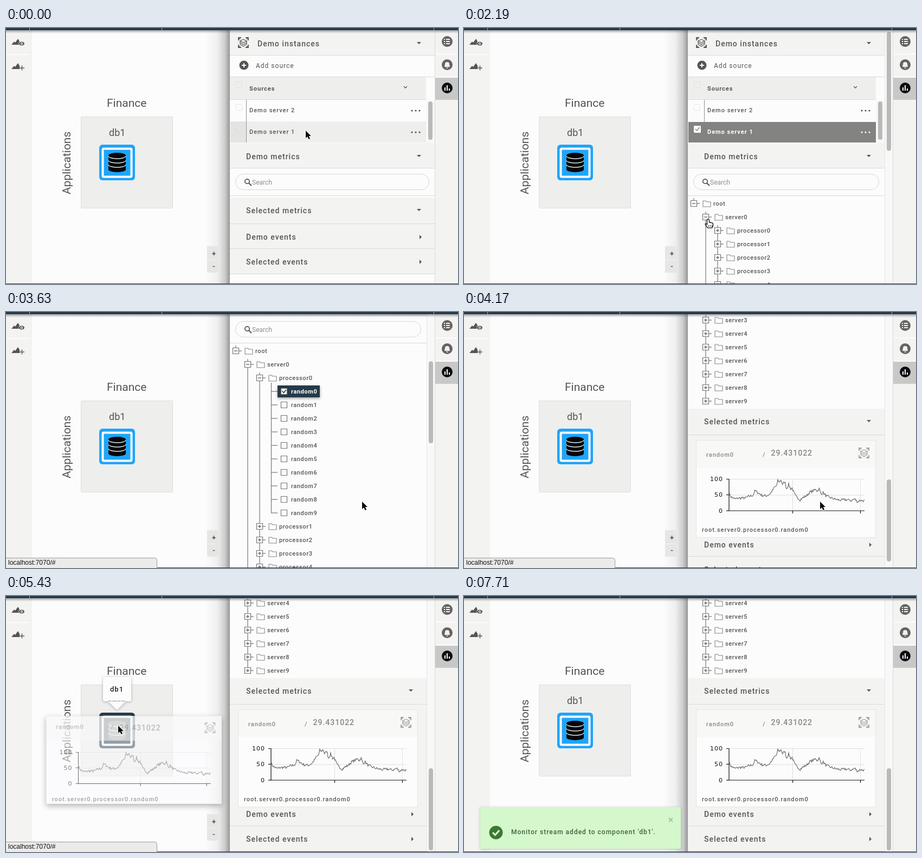
These frames come from a looping animation (834x474 px, 7.74 s). An HTML page with a canvas:

```html
<!DOCTYPE html>
<html>
<head>
<meta charset="utf-8">
<style>
html, body { margin: 0; width: 100%; height: 100%; overflow: hidden; background: #fcfcfe; }
canvas { display: block; }
</style>
</head>
<body>
<canvas id="stage" width="834" height="474"></canvas>
<script>
const c = document.getElementById('stage').getContext('2d');
const LOOP = 7740, TOP = 5, VIEW = 468, ROW = 25;
const WHITE = '#fcfcfd', TINT = '#f3f3f2', DEEP = '#eeeeed', LINE = '#dadad8';
const INK = '#555553', MUTED = '#8f8f8d', DARK = '#243a48', BLUE = '#1ea5fa';
const SANS = 'Roboto, Arial, sans-serif';

const T = { check: 600, root: 1770, server: 2100, proc: 2430, pick: 3000, hover: 4620, drag: 4950, over: 5280, drop: 5820, toast: 6150 };

// time, x, y, hand
const PATH = [
  [0, 553, 190, 0], [990, 553, 190, 0], [1440, 450, 244, 1],
  [1710, 424, 322, 1], [1800, 424, 322, 1], [2040, 446, 349, 1], [2130, 446, 349, 1], [2340, 468, 374, 1],
  [2490, 468, 374, 1], [2850, 515, 408, 1], [2940, 516, 402, 1], [3030, 516, 402, 1], [3300, 657, 351, 0],
  [4290, 657, 351, 0], [4740, 566, 231, 1], [4950, 566, 231, 0], [5400, 207, 240, 0], [5880, 207, 240, 0],
  [6480, 300, 500, 0]
];
const SCROLL = { from: 3300, time: 970, end: 937 };
const CURVE = [
  0,54, 4,43, 11,37, 19,40, 30,40, 36,45, 44,48, 48,63, 53,57, 61,48, 69,47, 75,52, 80,63, 84,74, 88,79,
  90,94, 93,90, 96,97, 99,82, 103,92, 106,69, 110,82, 114,68, 116,72, 122,48, 128,39, 131,34, 137,42,
  143,47, 149,58, 156,63, 160,68, 163,61, 166,70, 170,52, 173,58, 179,47, 185,42, 196,36, 206,33,
  215,35, 225,32, 232,37, 237,28, 242,33, 250,31
];

const clamp = v => Math.max(0, Math.min(1, v));
const smooth = v => v * v * (3 - 2 * v);

// Monotone cubic through the keys: rests stay still, passing points keep their speed
function track(keys, t) {
  const last = keys.length - 1;
  if (t >= keys[last][0]) return keys[last].slice(1);
  let i = 0;
  while (t >= keys[i + 1][0]) i++;
  const span = keys[i + 1][0] - keys[i][0], u = (t - keys[i][0]) / span;
  const slope = (n, j) => n < 0 || n >= last ? 0 : (keys[n + 1][j] - keys[n][j]) / (keys[n + 1][0] - keys[n][0]);
  const tangent = (n, j) => {
    const a = slope(n - 1, j), b = slope(n, j);
    return a * b > 0 ? 2 * a * b / (a + b) : 0;
  };
  return [1, 2, 3].map(j => {
    const a = keys[i][j], b = keys[i + 1][j];
    return a + (b - a) * smooth(u)
      + span * (tangent(i, j) * u * (1 - u) ** 2 - tangent(i + 1, j) * u * u * (1 - u));
  });
}

function rect(x, y, w, h, fill) { c.fillStyle = fill; c.fillRect(x, y, w, h); }

function round(x, y, w, h, r, fill, stroke, lw = 1) {
  c.beginPath();
  c.roundRect(x, y, w, h, r);
  if (fill) { c.fillStyle = fill; c.fill(); }
  if (stroke) { c.strokeStyle = stroke; c.lineWidth = lw; c.stroke(); }
}

function disc(x, y, r, fill) {
  c.beginPath(); c.arc(x, y, r, 0, 7); c.fillStyle = fill; c.fill();
}

function line(pts, color, lw = 1) {
  c.beginPath();
  for (let i = 0; i < pts.length; i += 2) c.lineTo(pts[i], pts[i + 1]);
  c.strokeStyle = color; c.lineWidth = lw; c.stroke();
}

function poly(pts, fill) {
  c.beginPath();
  for (let i = 0; i < pts.length; i += 2) c.lineTo(pts[i], pts[i + 1]);
  c.closePath(); c.fillStyle = fill; c.fill();
}

function text(s, x, y, size, color = INK, weight = 500, gap = 1, family = SANS, align = 'left') {
  c.font = `${weight} ${size}px ${family}`;
  c.letterSpacing = gap + 'px';
  c.textAlign = align;
  c.textBaseline = 'alphabetic';
  c.fillStyle = color;
  c.fillText(s, x, y + size * 0.36);
}

function shadow(color, blur, dy) { c.shadowColor = color; c.shadowBlur = blur; c.shadowOffsetY = dy; }

// Shadow around a box, leaving its inside clear
function halo(x, y, w, h, alpha) {
  c.save();
  c.beginPath();
  c.rect(x - 40, y - 40, w + 80, h + 80);
  c.rect(x, y, w, h);
  c.clip('evenodd');
  shadow(`rgba(60,60,60,${alpha})`, 10, 4);
  rect(x, y, w, h, '#fff');
  c.restore();
}

function caret(x, y, open) {
  poly(open ? [x - 4, y - 2, x + 4, y - 2, x, y + 2] : [x - 2, y - 4, x + 2, y, x - 2, y + 4], INK);
}

function layers(x, y, color) {
  for (const [sx, sy] of [[-1, -1], [1, -1], [1, 1], [-1, 1]]) {
    line([x + sx * 9, y + sy * 4, x + sx * 9, y + sy * 9, x + sx * 4, y + sy * 9], color, 1.8);
    line([x + sx * 6, y + sy * 6, x + sx * 9, y + sy * 9], color, 1.2);
  }
  line([x, y - 6, x + 6, y - 3, x, y, x - 6, y - 3, x, y - 6], color, 1.2);
  line([x - 6, y - 3, x - 6, y + 3, x, y + 7, x + 6, y + 3, x + 6, y - 3], color, 1.2);
  line([x - 6, y, x, y + 3.5, x + 6, y], color, 1.2);
}

function mountains(x, y) {
  poly([x - 12, y + 5, x - 7, y - 1, x - 5, y + 1, x, y - 6, x + 7, y + 5], INK);
}

function leftBar() {
  rect(0, 4, 48, 470, TINT);
  rect(0, 48, 44, 2, WHITE);
  mountains(22, 26);
  disc(29, 29, 5.5, TINT);
  c.beginPath(); c.ellipse(29, 29, 5, 3.5, 0, 0, 7); c.fillStyle = INK; c.fill();
  disc(29, 29, 2.2, TINT); disc(29, 29, 1.1, INK);
  mountains(22, 71);
  rect(25, 69, 9, 9, TINT);
  line([25, 74, 34, 74], INK, 1.4); line([29.5, 69.5, 29.5, 78.5], INK, 1.4);
}

function rightBar() {
  rect(791, 4, 43, 470, TINT);
  rect(791, 4, 1, 470, LINE);
  rect(792, 92, 42, 41, '#c8c8c7');
  rect(793, 47, 41, 2, WHITE);
  rect(793, 90, 41, 2, WHITE);
  disc(814, 25, 10, '#646462');
  for (const y of [21, 25, 29]) { rect(808, y - 1, 2, 2, TINT); rect(812, y - 1, 7, 2, TINT); }
  disc(814, 68, 10, '#646462');
  c.beginPath(); c.arc(814, 67, 4, Math.PI, 0); c.lineTo(819, 72); c.lineTo(809, 72);
  c.fillStyle = TINT; c.fill();
  rect(812.5, 73, 3, 1.5, TINT);
  disc(814, 111, 10, '#0b0d10');
  rect(809, 110, 2, 6, WHITE); rect(813, 106, 2, 10, WHITE); rect(817, 112, 2, 4, WHITE);
}

function database(over) {
  const box = over ? DARK : BLUE;
  round(172, 216, 66, 66, 6, box);
  round(178.5, 223.5, 53, 52, 2, box, '#fff', 4);
  c.beginPath();
  c.ellipse(205, 236, 16, 5, 0, Math.PI, 0);
  c.lineTo(221, 262);
  c.ellipse(205, 262, 16, 5, 0, 0, Math.PI);
  c.closePath(); c.fillStyle = over ? '#70706c' : '#050607'; c.fill();
  for (const y of [237, 245, 253]) {
    c.beginPath(); c.ellipse(205, y, 16, 5, 0, 0.05, Math.PI - 0.05);
    c.strokeStyle = '#dfe8ec'; c.lineWidth = 1.4; c.stroke();
  }
}

function canvasArea(over) {
  rect(48, 4, 365, 470, WHITE);
  text('Finance', 186, 138, 21, INK, 400, 0);
  c.save();
  c.translate(111, 308); c.rotate(-Math.PI / 2);
  text('Applications', 0, 0, 21, INK, 400, 0);
  c.restore();
  round(138.5, 164.5, 169, 169, 1, DEEP, '#dededc');
  text('db1', 190, 193.5, 18, INK, 400, 0);
  database(over);
  const g = c.createLinearGradient(368, 0, 413, 0);
  g.addColorStop(0, 'rgba(120,120,120,0)');
  g.addColorStop(0.5, 'rgba(120,120,120,.1)');
  g.addColorStop(0.8, 'rgba(120,120,120,.36)');
  g.addColorStop(1, 'rgba(110,110,110,.72)');
  rect(368, 4, 45, 470, g);
  rect(371, 404, 25, 25, '#e6e6e5'); rect(371, 430, 25, 23, '#e6e6e5');
  text('+', 383.5, 417, 13, INK, 700, 0, SANS, 'center');
  text('-', 383.5, 441, 13, INK, 700, 0, SANS, 'center');
}

function header(top, bottom, label, cy, open, R, x = 443) {
  rect(413, top, R - 413, bottom - top, TINT);
  rect(413, bottom, R - 413, 1, LINE);
  text(label, x, cy, 14);
  caret(open ? R - 29 : R - 26, open ? cy - 1 : cy, open);
}

function dots(x, y, color) { for (const d of [-7, 0, 7]) disc(x + d, y, 1.6, color); }

function sources(R, checked) {
  const E = R - 16;
  rect(413, 91, E - 413, 42, DEEP);
  rect(413, 90, R - 413, 1, LINE);
  rect(413, 132, E - 413, 1, LINE);
  text('Sources', 449, 112, 11, INK, 600);
  line([E - 41, 108, E - 38, 111, E - 35, 108], INK, 1.3);
  round(424.5, 99.5, 11, 11, 1, null, '#e2e2e0');
  round(424.5, 141.5, 11, 11, 1, WHITE, '#e6e6e4');
  text('Demo server 2', 449, 152, 11);
  dots(E - 19, 153, INK);
  if (checked) {
    rect(414, 174, E - 414, 38, '#838381');
    round(424, 181, 13, 13, 1.5, WHITE);
    line([427, 187, 430, 190, 434.5, 184], '#838381', 1.4);
  } else {
    rect(414, 173, E - 414, 39, DEEP);
    rect(414, 173, 29, 39, '#e4e4e2');
    round(424.5, 181.5, 11, 11, 1, null, LINE);
  }
  text('Demo server 1', 449, 192, 11, checked ? '#fff' : INK, checked ? 700 : 500);
  dots(E - 19, 193, checked ? '#fff' : INK);
  rect(443, 133, 1, checked ? 41 : 79, '#929290');
  rect(E, 133, 16, 80, '#f8f8f8');
  round(E + 4, 136, 8, 71, 4, '#b9b9b8');
}

function search(R) {
  rect(413, 260, R - 413, 51, WHITE);
  rect(413, 310, R - 413, 1, LINE);
  round(423.5, 270.5, R - 434, 29, 14.5, WHITE, '#d6d6d4');
  c.beginPath(); c.arc(445, 284, 4.2, 0, 7); c.strokeStyle = INK; c.lineWidth = 1.8; c.stroke();
  line([448, 287, 453, 292], INK, 2.2);
  text('Search', 454, 285.5, 12, MUTED, 400, 0);
}

// Visible rows of the tree: depth, label, state
function treeRows(t) {
  const rows = [];
  if (t < T.check) return rows;
  rows.push([0, 'root', t >= T.root]);
  if (t < T.root) return rows;
  for (let s = 0; s < 10; s++) {
    const sOpen = !s && t >= T.server;
    rows.push([1, 'server' + s, sOpen]);
    for (let p = 0; sOpen && p < 10; p++) {
      const pOpen = !p && t >= T.proc;
      rows.push([2, 'processor' + p, pOpen]);
      for (let r = 0; pOpen && r < 10; r++) rows.push([3, 'random' + r, !r && t >= T.pick]);
    }
  }
  return rows;
}

function tree(rows, R) {
  const wire = '#747472';
  rect(413, 311, R - 413, rows.length * ROW + 2, WHITE);
  for (let d = 0; d < 4; d++) {
    const ys = rows.map((r, i) => r[0] === d ? 325 + i * ROW : 0).filter(Boolean);
    if (ys.length) {
      const x = d < 3 ? 424 + d * 22 : 489.5;
      line([x, ys[0] - (d < 3 ? 10 : 16), x, ys[ys.length - 1]], wire, 1.2);
    }
  }
  rows.forEach(([d, label, on], i) => {
    const y = 325 + i * ROW, x = 424 + d * 22;
    if (d < 3) {
      line([x, y, x + 11, y], wire, 1.2);
      round(x - 5.5, y - 5.5, 11, 11, 0, WHITE, wire, 1.2);
      line([x - 3, y, x + 3, y], INK, 1.2);
      if (!on) line([x, y - 3, x, y + 3], INK, 1.2);
      line([x + 17, y - 5, x + 22, y - 5, x + 24, y - 3, x + 31, y - 3, x + 31, y + 6, x + 17, y + 6, x + 17, y - 5.5], '#868684', 1.1);
      text(label, x + 36, y, 11, INK, 500, 0.6);
      return;
    }
    line([489, y, 501, y], wire, 1.2);
    if (on) {
      c.save();
      shadow('rgba(90,90,90,.6)', 5, 2);
      rect(501, y - 11, 78, 22, DARK);
      c.restore();
    }
    round(507.5, y - 5.5, 11, 11, 0, WHITE, '#777775', 1.2);
    if (on) line([509.5, y - 1, 512.5, y + 2.5, 517, y - 3], DARK, 1.6);
    text(label, 526, y, 11, on ? '#fff' : INK, on ? 700 : 500, 0.6);
  });
}

function plot(x, y, w, h) {
  for (const k of [0, 0.5]) line([x, y + h * k + 0.5, x + w, y + h * k + 0.5], '#dededc');
  line([x + w * 0.47, y, x + w * 0.47, y + h], '#dededc');
  line([x + w * 0.97, y, x + w * 0.97, y + h], '#e4e4e2');
  line([x - 5, y + 0.5, x, y + 0.5, x, y + h, x + w, y + h], '#111', 1.2);
  line([x - 5, y + h, x, y + h], '#111', 1.2);
  line([x - 5, y + h / 2, x, y + h / 2], '#111', 1.2);
  for (const k of [0.47, 0.97]) line([x + w * k, y + h, x + w * k, y + h + 5], '#111', 1.2);
  ['100', '50', '0'].forEach((s, i) =>
    text(s, x - 11, y + h * i / 2, 11, '#111', 400, 1, '"DejaVu Sans", sans-serif', 'right'));
  const pts = [];
  let j = 0, seed = 7;
  for (let px = 0; px <= 250; px += 1.25) {
    while (CURVE[j + 2] < px) j += 2;
    const k = (px - CURVE[j]) / (CURVE[j + 2] - CURVE[j]);
    seed = seed * 16807 % 2147483647;
    const v = CURVE[j + 1] + (CURVE[j + 3] - CURVE[j + 1]) * k + (seed / 2147483647 - 0.5) * 8;
    pts.push(x + px * w / 250, y + h * (1 - v / 100));
  }
  line(pts, '#62625f', 1.1);
}

// m: width, height, header height, then y of name, value, plot, path
function card(x, y, m, ink, mark) {
  const [w, h, hd, name, value, top, path] = m, k = w / 332;
  rect(x, y, w, h, WHITE);
  rect(x, y, w, hd, '#f8f8f7');
  c.strokeStyle = '#e6e6e4'; c.lineWidth = 1;
  c.strokeRect(x + 0.5, y + 0.5, w - 1, h - 1);
  text('random0', x + 19 * k, y + name, 11, ink);
  text('/', x + 123 * k, y + name, 11, ink);
  text('29.431022', x + 138.5 * k, y + value, 14, ink);
  layers(x + 310 * k, y + value, mark);
  plot(x + 61 * k, y + top, 250 * k, 59 * (0.5 + k / 2));
  text('root.server0.processor0.random0', x + 11 * k, y + path, 11);
}

function panel(t) {
  const checked = t >= T.check, R = checked ? 776 : 791;
  const rows = treeRows(t), picked = t >= T.pick;
  const selY = 338 + rows.length * ROW, evY = selY + (picked ? 228 : 49);
  const height = evY + 69 - TOP;
  const off = SCROLL.end * smooth(clamp((t - SCROLL.from) / SCROLL.time));

  c.save();
  c.beginPath(); c.rect(413, TOP, 378, VIEW); c.clip();
  rect(413, TOP, 378, VIEW, WHITE);
  c.save();
  c.translate(0, -Math.round(off));
  header(TOP, 50, 'Demo instances', 29, true, R, 464);
  layers(438, 27, INK);
  disc(439, 69, 8.5, INK);
  line([435, 69, 443, 69], WHITE, 2); line([439, 65, 439, 73], WHITE, 2);
  text('Add source', 461, 70, 12, INK, 400);
  sources(R, checked);
  header(213, 259, 'Demo metrics', 238, true, R);
  search(R);
  tree(rows, R);
  header(selY - 24, selY + 24, 'Selected metrics', selY, true, R);
  if (picked) rect(413, selY + 25, R - 413, 190, TINT);
  header(evY - 24, evY + 21, 'Demo events', evY, false, R);
  header(evY + 22, evY + 68, 'Selected events', evY + 46, false, R);
  if (picked) {
    const lift = t < T.drag ? smooth(clamp((t - T.hover) / 180)) : 0;
    rect(413, selY + 24, R - 413, 1, LINE);
    c.save();
    c.translate(594, selY + 124.5);
    c.scale(1 + 0.05 * lift, 1 + 0.05 * lift);
    if (lift) halo(-166, -90.5, 332, 181, 0.55 * lift);
    const near = lift > 0.5;
    card(-166, -90.5, [332, 181, 51, 27, 24, 72, 166], near ? INK : '#868684', near ? INK : '#a2a2a0');
    c.restore();
  }
  c.restore();
  if (height > VIEW) {
    rect(776, TOP, 15, VIEW, '#f8f8f8');
    rect(776, TOP, 1, VIEW, '#e6e6e5');
    const k = VIEW / height;
    round(780, TOP + off * k + 2, 8, VIEW * k - 4, 4, '#b9b9b8');
  }
  c.restore();
}

function tooltip() {
  c.save();
  shadow('rgba(100,100,100,.5)', 5, 1);
  c.beginPath();
  c.roundRect(179, 150, 52, 45, 3);
  c.moveTo(187, 194); c.lineTo(205, 211); c.lineTo(222, 194);
  c.fillStyle = WHITE; c.fill();
  c.restore();
  text('db1', 192, 172, 13, '#222220');
}

function toast(t) {
  const k = smooth(clamp((t - T.toast) / 240));
  if (!k) return;
  c.save();
  c.globalAlpha = k;
  c.save();
  shadow('rgba(110,130,110,.5)', 5, 1);
  round(30, 391, 370, 77, 2, '#d4f8cc');
  c.restore();
  disc(59, 438, 12.5, '#3c7a34');
  line([53, 438, 57.5, 442.5, 65, 434], '#e9ffe4', 3);
  text("Monitor stream added to component 'db1'.", 87, 437, 12, '#406040');
  line([378, 411, 385, 418], '#a9bfa4', 2); line([385, 411, 378, 418], '#a9bfa4', 2);
  c.restore();
}

function statusBar() {
  round(-1, 455.5, 279.5, 22, [0, 4, 0, 0], '#ebebea', '#9a9a98');
  text('localhost:7070/#', 4, 464, 12, '#111', 400, 0, '"Liberation Sans", Arial, sans-serif');
}

function cursor(x, y, hand) {
  c.save();
  c.translate(x, y);
  c.lineJoin = 'round';
  c.beginPath();
  if (hand) {
    const p = [-1.5, 0, 1, 0, 2, 1.5, 2, 6, 4, 5.5, 5.5, 6.5, 7.5, 6.5, 8.5, 8, 9, 8, 9, 12, 7, 16, -1, 16, -4, 11.5, -5.5, 9, -4, 8, -2, 10, -2, 1];
    for (let i = 0; i < p.length; i += 2) c.lineTo(p[i], p[i + 1]);
    c.closePath();
    c.fillStyle = '#fff'; c.fill();
    c.strokeStyle = '#111'; c.lineWidth = 1.3; c.stroke();
    for (const i of [1, 4, 7]) line([i, 11, i, 14], '#111');
  } else {
    const p = [0, 0, 0, 14, 3.2, 11, 5.5, 16, 8, 15, 5.8, 10, 10, 10];
    for (let i = 0; i < p.length; i += 2) c.lineTo(p[i], p[i + 1]);
    c.closePath();
    c.strokeStyle = '#fff'; c.lineWidth = 2; c.stroke();
    c.fillStyle = '#0a0a0a'; c.fill();
  }
  c.restore();
}

function frame() {
  rect(0, 0, 834, 4, DARK);
  for (const x of [43, 287, 789]) rect(x, 0, 1, 4, '#a4b0b8');
  const g = c.createLinearGradient(0, 4, 0, 10);
  g.addColorStop(0, 'rgba(60,66,70,.5)');
  g.addColorStop(1, 'rgba(100,100,100,0)');
  rect(0, 4, 834, 6, g);
  rect(0, 473, 834, 1, '#3c3c3c');
}

function draw(t) {
  const [x, y, hand] = track(PATH, t);
  const dragging = t >= T.drag && t < T.drop;
  const over = dragging && t >= T.over;
  c.clearRect(0, 0, 834, 474);
  leftBar();
  canvasArea(over);
  panel(t);
  rightBar();
  toast(t);
  if (over) tooltip();
  if (dragging) {
    c.save();
    c.globalAlpha = 0.52;
    halo(x - 133, y - 18, 324, 163, 0.7);
    card(x - 133, y - 18, [324, 163, 46, 20, 22, 67, 154], '#868684', '#a2a2a0');
    c.restore();
  }
  frame();
  if (t >= T.pick && t < T.drop) statusBar();
  cursor(x, y, hand > 0.5);
}

const start = performance.now();
function tick() {
  draw((performance.now() - start) % LOOP);
  requestAnimationFrame(tick);
}
tick();
</script>
</body>
</html>
```
